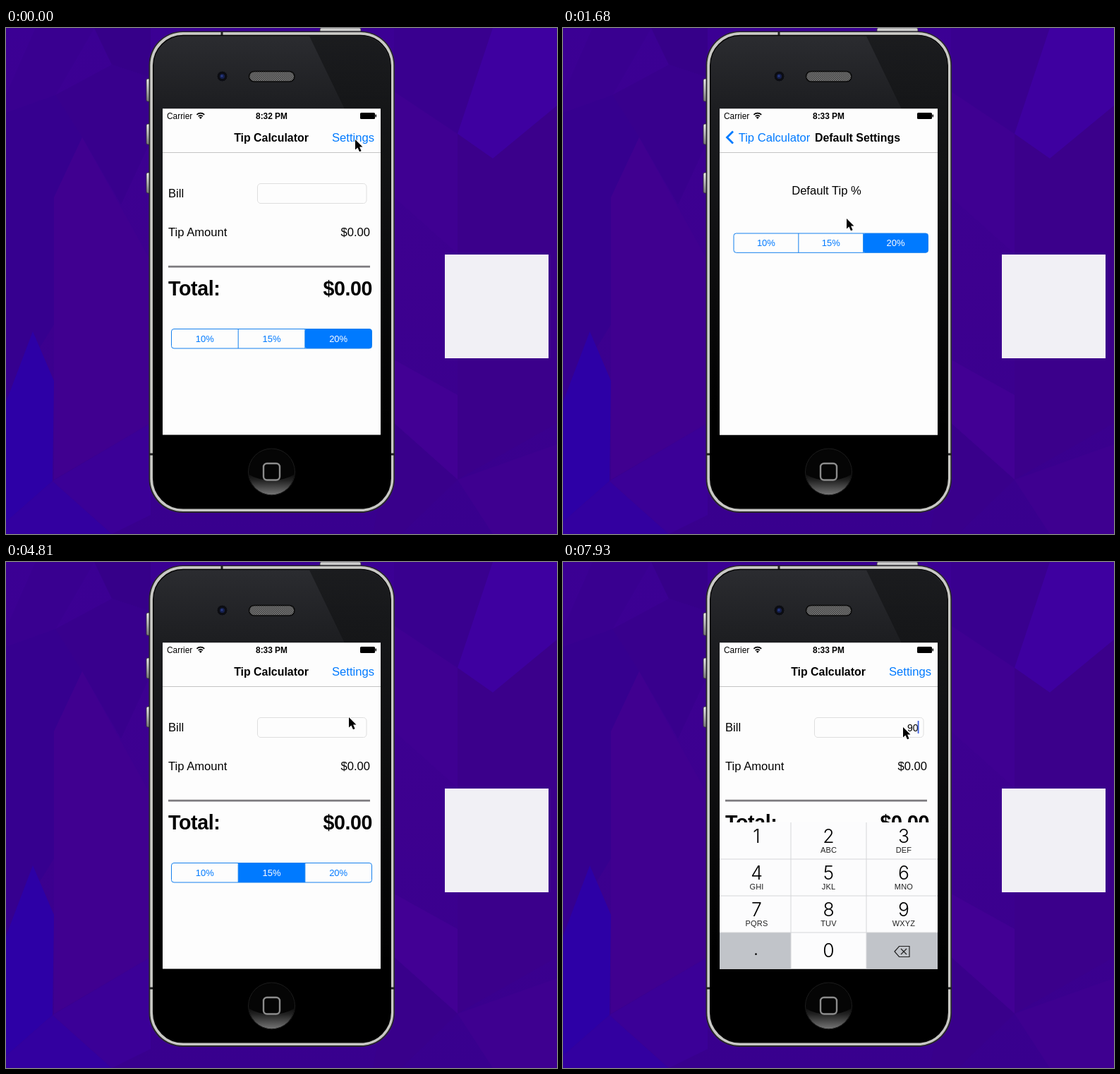
Write an HTML page that moves like this. It is 781 px wide and 717 px high and loops after 8 s.

```html
<!DOCTYPE html>
<html lang="en">
<head>
<meta charset="utf-8">
<title>Tip calculator demo</title>
<style>
  html, body { margin: 0; width: 100%; height: 100%; overflow: hidden; background: #3c008f; }
  svg { display: block; width: 781px; height: 717px; }
  text { font: 16.6px "Liberation Sans", Arial, sans-serif; fill: #000; }
  .mid { text-anchor: middle; }
  .end { text-anchor: end; }
  .blue { fill: #007aff; }
  .title { font-size: 15.9px; font-weight: bold; }
  .status { font-size: 11.9px; }
  .bold { font-weight: bold; }
  .total { font-size: 28.6px; font-weight: bold; letter-spacing: -.4px; }
  .seg { font-size: 13px; text-anchor: middle; fill: #007aff; }
  .chosen { fill: #fff; }
  .digit { font: 300 26.5px Inter, "Liberation Sans", sans-serif; text-anchor: middle; }
  .letters { font-size: 11px; text-anchor: middle; fill: #222; letter-spacing: .2px; }
  .entry { font-size: 14px; text-anchor: end; }
</style>
</head>
<body>
<svg viewBox="0 0 781 717">
  <defs>
    <linearGradient id="wall" x2="0" y2="1">
      <stop offset="0" stop-color="#3b0094"/><stop offset=".5" stop-color="#3d008f"/><stop offset="1" stop-color="#38008e"/>
    </linearGradient>
    <linearGradient id="glass" x2="0" y2="1">
      <stop offset="0" stop-color="#2b2c30"/><stop offset=".16" stop-color="#1c1d20"/>
      <stop offset=".55" stop-color="#0b0b0c"/><stop offset=".8" stop-color="#000"/>
    </linearGradient>
    <linearGradient id="gloss" x2="0" y2="1">
      <stop offset="0" stop-color="#141517"/><stop offset=".3" stop-color="#101112"/><stop offset="1" stop-color="#000"/>
    </linearGradient>
    <linearGradient id="steel" x2="0" y2="1">
      <stop offset="0" stop-color="#eee"/><stop offset=".5" stop-color="#b5b5b5"/><stop offset="1" stop-color="#777"/>
    </linearGradient>
    <linearGradient id="home" x2="0" y2="1">
      <stop offset=".5" stop-color="#050505"/><stop offset=".68" stop-color="#222"/><stop offset="1" stop-color="#777"/>
    </linearGradient>
    <linearGradient id="edge">
      <stop offset="0" stop-opacity="0"/><stop offset="1" stop-opacity=".1"/>
    </linearGradient>
    <pattern id="mesh" width="3" height="3" patternUnits="userSpaceOnUse">
      <rect width="3" height="3" fill="#3a3a3a"/>
      <path d="M0 0h1.4v1.4h-1.4zM1.5 1.5h1.4v1.4h-1.4z" fill="#858585"/>
    </pattern>
    <clipPath id="screen"><rect x="222" y="114.500" width="309" height="462"/></clipPath>
    <clipPath id="button"><circle cx="376.500" cy="629" r="32.500"/></clipPath>
  </defs>

  <rect width="781" height="717" fill="url(#wall)"/>
  <g id="facets"></g>
  <rect x="622" y="321" width="147" height="147" fill="#f1f0f5"/>

  <g id="phone">
    <g fill="url(#steel)" stroke="#333" stroke-width=".8">
      <rect x="199" y="72" width="6" height="32" rx="2"/>
      <rect x="199" y="136" width="6" height="29" rx="2"/>
      <rect x="199" y="205" width="6" height="29" rx="2"/>
      <rect x="445" y="0" width="58" height="8" rx="2"/>
    </g>
    <rect x="202.500" y="4.500" width="348.500" height="682.500" rx="48" fill="#29282c"/>
    <rect x="204.300" y="6" width="345" height="679" rx="46.500" fill="#c9c9c5"/>
    <path d="M306 5v6M203 604h6M544 604h7" stroke="#222" stroke-width="3"/>
    <rect x="208.700" y="10.500" width="336.500" height="670.300" rx="42.500" fill="url(#glass)" stroke="#060606" stroke-width="1.500"/>
    <path d="M430 11.500H502a42 42 0 0 1 42 43V576H531V115H480Z" fill="url(#gloss)" opacity=".7"/>
    <path d="M209.500 560H544V637a43 43 0 0 1-43 43H252.500a43 43 0 0 1-43-43Z" fill="#000"/>
    <circle cx="306.500" cy="68.500" r="7.500" fill="#0c0d12" stroke="#25262a"/>
    <circle cx="306.500" cy="68.500" r="3.500" fill="#16204e"/>
    <circle cx="306" cy="68" r="1.500" fill="#2b3e8a"/>
    <rect x="344.500" y="61.500" width="64.500" height="14.500" rx="7.200" fill="url(#mesh)" stroke="#0a0a0a" stroke-width="1.500"/>
    <g clip-path="url(#button)">
      <circle cx="376.500" cy="629" r="33" fill="url(#home)"/>
      <ellipse cx="376.500" cy="612" rx="46" ry="29" fill="#050505"/>
    </g>
    <circle cx="376.500" cy="629" r="33" fill="none" stroke="#1d1d1d"/>
    <rect x="365" y="617" width="23" height="23.500" rx="5" fill="none" stroke="#8c8c8c" stroke-width="2.400"/>
  </g>

  <g clip-path="url(#screen)">
    <rect x="222" y="114" width="309" height="463" fill="#fdfdfd"/>
    <g id="main">
      <text x="230" y="240">Bill</text>
      <rect x="356.500" y="220.500" width="154.500" height="28" rx="4.500" fill="#fdfdfd" stroke="#dedede"/>
      <text x="230" y="295">Tip Amount</text>
      <text x="516" y="295" class="end">$0.00</text>
      <path d="M230 338.200H516" stroke="#7c7a7e" stroke-width="2.800"/>
      <text x="230" y="379" class="total">Total:</text>
      <text x="519" y="379" class="total end">$0.00</text>
      <g id="mainSeg"></g>
      <text id="entry" x="503.500" y="239.500" class="entry"></text>
      <rect id="caret" x="502.700" y="225" width="1.800" height="18" fill="#3f62e0"/>
    </g>
    <rect id="dim" x="222" y="177" width="309" height="400"/>
    <g id="prefs">
      <rect x="213" y="177" width="9" height="400" fill="url(#edge)"/>
      <rect x="222" y="177" width="320" height="400" fill="#fdfdfd"/>
      <text x="373.500" y="236" class="mid">Default Tip %</text>
      <g id="prefsSeg"></g>
    </g>
    <rect x="222" y="114" width="309" height="62" fill="#fdfdfd"/>
    <rect id="navDim" x="222" y="114" height="62"/>
    <path d="M222 176.500H531" stroke="#c4c4c4"/>
    <g id="mainTitle"><text x="376" y="161" class="title mid">Tip Calculator</text></g>
    <text id="settings" x="522" y="161" class="blue end">Settings</text>
    <path id="chevron" d="M241 146.500L232.500 155L241 163.500" fill="none" stroke="#007aff" stroke-width="2.800"/>
    <g id="back"><text x="299.500" y="161" class="blue mid">Tip Calculator</text></g>
    <g id="prefsTitle"><text x="417.500" y="161" class="title mid">Default Settings</text></g>

    <text x="228" y="129" class="status">Carrier</text>
    <text id="clock" x="376.500" y="129" class="status bold mid"></text>
    <path d="M270.400 122.800a8 8 0 0 1 10.800 0M272.600 125.200a5 5 0 0 1 6.400 0" fill="none" stroke="#000" stroke-width="1.700"/>
    <path d="M275.800 129l-2-2.300a3 3 0 0 1 4 0Z"/>
    <rect x="502" y="120" width="21" height="9" rx="1.500"/>
    <rect x="523.500" y="122.500" width="1.500" height="4" rx=".7"/>
    <g id="keyboard"></g>
  </g>
  <path id="cursor" d="M0 0V14.500L3.400 11.400L6 17.300L8.600 16.200L6.100 10.500H10.500Z"
    stroke="#fff" stroke-width="2" paint-order="stroke"/>
</svg>
<script>
const $ = id => document.getElementById(id);
const LOOP = 8000, TICK = 145, WIDTH = 309;

// Background facets: colour, then polygon points
$('facets').innerHTML = [
  ['#390090', '42,0 125,0 70,95 0,120 0,95'],
  ['#360089', '125,0 205,0 205,70 150,52'],
  ['#38008d', '70,95 150,52 205,70 205,160 163,250 108,155'],
  ['#36008f', '0,120 70,95 108,155 68,240 68,420 0,530'],
  ['#400090', '108,155 205,330 205,560 68,640 68,240'],
  ['#2d00a6', '0,530 38,430 68,500 66,642 0,700'],
  ['#3300a0', '0,700 66,642 150,717 0,717'],
  ['#3b0097', '66,642 205,560 205,690 150,717'],
  ['#39008f', '550,0 690,0 640,150 550,90'],
  ['#3e00a0', '690,0 781,0 781,110 690,185 640,150'],
  ['#3f0092', '550,90 640,150 640,320 550,240'],
  ['#3b008b', '640,150 690,185 781,110 781,560 640,640'],
  ['#420094', '550,470 640,520 640,640 550,560'],
  ['#39008b', '550,560 640,640 560,717 520,717'],
  ['#3e0090', '640,640 781,590 781,717 690,717']
].map(([fill, points]) => `<polygon fill="${fill}" points="${points}"/>`).join('');

// Three-part control; `tint` is the strength of the chosen part, `pressed` the part being touched
function segments(x, y, w, h, chosen, tint = 1, pressed = -1) {
  const part = w / 3;
  let out = '';
  for (let i = 0; i < 3; i++) {
    const start = x + i * part, on = i === chosen;
    if (on || i === pressed)
      out += `<rect x="${start}" y="${y}" width="${part}" height="${h}" rx="${i === 1 ? 0 : 3}"
        fill="#007aff" opacity="${on ? tint : .15}"/>`;
    out += `<text class="seg ${on ? 'chosen' : ''}" x="${start + part / 2}" y="${y + h / 2 + 4.5}"
      opacity="${on ? tint ** 3 : 1}">${10 + 5 * i}%</text>`;
  }
  return out + `<rect x="${x}" y="${y}" width="${w}" height="${h}" rx="3.5" fill="none" stroke="#1580ee"/>
    <path d="M${x + part} ${y}v${h}M${x + 2 * part} ${y}v${h}" stroke="#1580ee"/>`;
}

function buildKeyboard() {
  const letters = ['', 'ABC', 'DEF', 'GHI', 'JKL', 'MNO', 'PQRS', 'TUV', 'WXYZ'];
  let out = `<rect x="222" y="369" width="309" height="208" fill="#fcfcfd"/>
    <path d="M222 525H323V577H222ZM430 525H531V577H430Z" fill="#c1c4c9"/>
    <path d="M222 421H531M222 473H531M222 525H531M323 369V577M430 369V577" stroke="#d5d6d9"/>`;
  letters.forEach((word, i) => {
    const x = [274.5, 376.5, 483][i % 3], y = 397.5 + 52 * Math.floor(i / 3);
    out += `<text class="digit" x="${x}" y="${y}">${i + 1}</text>
      <text class="letters" x="${x}" y="${y + 14.5}">${word}</text>`;
  });
  return out + `<text class="digit" x="273.500" y="557">.</text>
    <text class="digit" x="376.500" y="560">0</text>
    <path d="M470 552L476.500 544.500H491V559.500H476.500ZM479 548l8 8M487 548l-8 8"
      fill="none" stroke="#222" stroke-width="1.200"/>`;
}
$('keyboard').innerHTML = buildKeyboard();

// Lists hold [start, ...value]; the latest started entry applies
const at = (list, t) => list.filter(e => e[0] <= t).pop().slice(1);
const cursorPath = [
  [0, 495, 158], [1380, 478, 172], [1530, 440, 215], [1680, 402, 270], [1830, 382, 294], [1980, 376, 300],
  [3030, 370, 305], [3180, 310, 232], [3320, 256, 172], [3470, 239, 155],
  [4370, 270, 164], [4510, 350, 188], [4660, 450, 212], [4810, 486, 220], [4960, 484, 228], [5110, 482, 234]
];
const caretAlpha = [
  [0, 0], [5400, 1], [5990, .5], [6140, 0], [6440, 1], [6880, .5], [7030, 0], [7330, .5], [7480, 1]
];
const typed = [[0, ''], [7780, '9'], [7930, '90']];

// Share of a spring move still left, sampled once per tick
const ticks = (t, start) => Math.floor((t - start) / TICK);
function left(n) {
  if (n < 0) return 1;
  if (n > 3) return 0;
  const k = 1.71 + 1.94 * n;
  return (1 + k) * Math.exp(-k);
}
const clamp = v => Math.max(0, Math.min(1, v));
const fadeOut = n => n < 0 ? 1 : .32 * clamp(1 - n / 3) ** 1.7;
const fadeIn = n => n < 0 ? 0 : clamp(.06 + n / 2);
const shift = (id, x, y = 0) => $(id).setAttribute('transform', `translate(${x} ${y})`);
const alpha = (id, v) => $(id).setAttribute('opacity', v);

let segKey = '';
function drawSegments(t) {
  const changed = t >= 4070, chosen = t >= 2730, touched = t >= 2580 && !chosen;
  const tint = changed && ticks(t, 4070) < 1 ? .82 : 1;
  const key = [changed, chosen, touched, tint].join();
  if (key === segKey) return;
  segKey = key;
  $('mainSeg').innerHTML = segments(234.5, 426.5, 284, 27.5, changed ? 1 : 2, tint);
  $('prefsSeg').innerHTML = segments(242, 291, 275.5, 27.3, chosen ? 1 : 2, 1, touched ? 1 : -1);
}

function draw(t) {
  const popping = t >= 4070;
  const n = ticks(t, popping ? 4070 : 500);
  const p = popping ? 1 - left(n) : left(n);
  const home = popping ? fadeIn(n) : fadeOut(n);
  const away = popping ? fadeOut(n) : fadeIn(n);
  const edge = WIDTH * p;

  shift('main', -92.4 * (1 - p));
  shift('prefs', edge);
  alpha('prefs', p < 1 ? 1 : 0);
  alpha('dim', .09 * (1 - p));
  $('navDim').setAttribute('width', p > 0 ? Math.min(WIDTH, edge + 11) : 0);
  alpha('navDim', .07 * (1 - p));

  shift('mainTitle', -76.5 * (1 - p));
  shift('back', 68 * p);
  shift('prefsTitle', 154 * p);
  alpha('mainTitle', popping ? (n < 1 ? 0 : home) : n < 0 ? 1 : 0);
  alpha('settings', home);
  alpha('back', away);
  alpha('prefsTitle', away);
  alpha('chevron', popping ? away : clamp(n / 3));

  drawSegments(t);
  $('clock').textContent = t < 1680 ? '8:32 PM' : '8:33 PM';
  shift('keyboard', 0, 208 * left(ticks(t, 5400)));
  $('entry').textContent = at(typed, t)[0];
  alpha('caret', at(caretAlpha, t)[0]);
  shift('cursor', ...at(cursorPath, t));
}

function frame() {
  draw(performance.now() % LOOP);
  requestAnimationFrame(frame);
}
frame();
</script>
</body>
</html>
```
